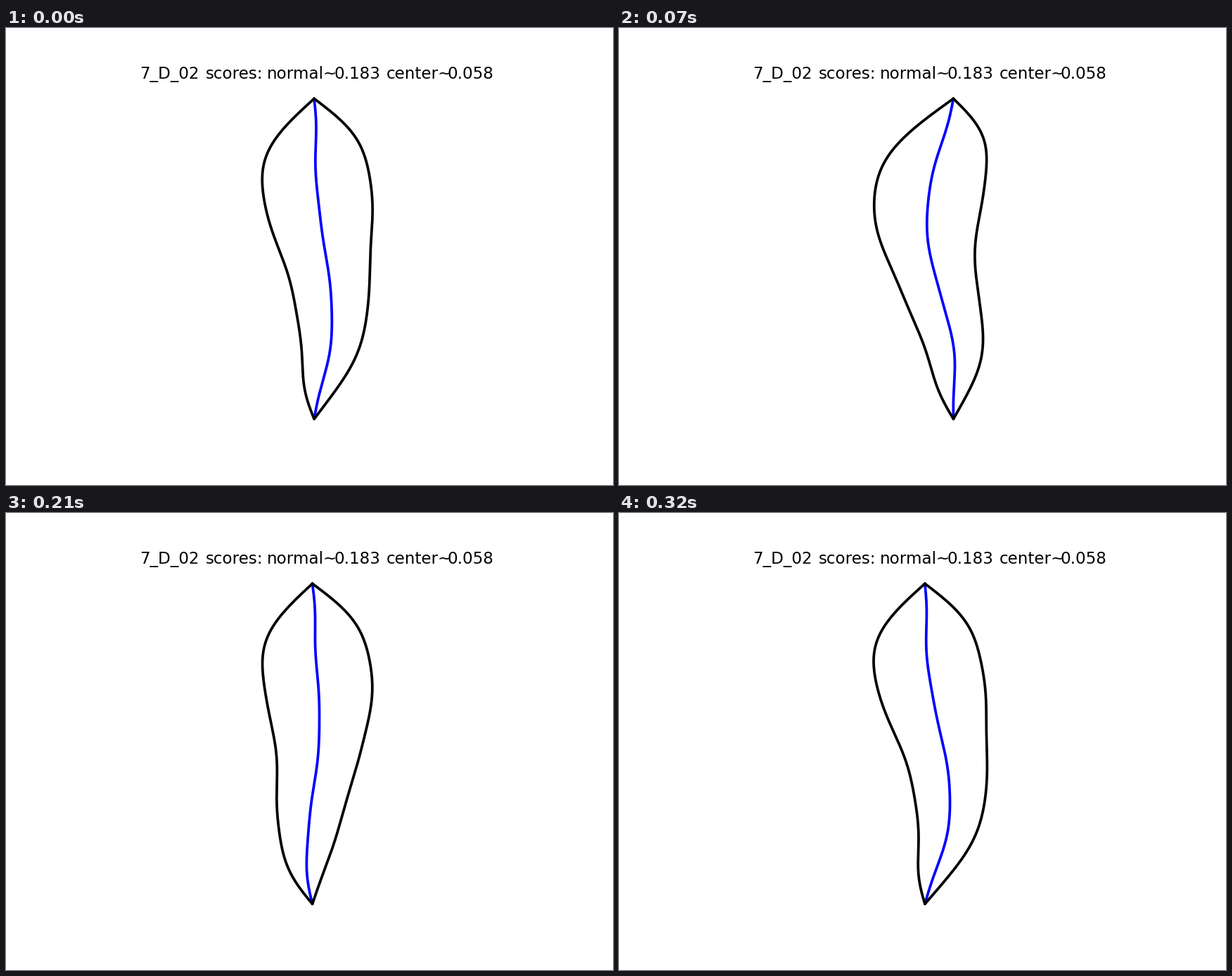
A matplotlib script for the animation above (350 ms loop, 863 by 649 pixels).

```python
import numpy as np
import matplotlib.pyplot as plt
from matplotlib.animation import FuncAnimation

W, H, DPI = 863, 649, 64
PT = 72 / DPI  # points per pixel
TOP, BOTTOM, CENTER = 100.3, 555.3, 442.7

# Strengths of the first bending waves of the midrib, one row per pose.
BENDS = [(18.3, -10, 0.9), (-27.5, -13.9, 4.3), (-55.8, 6.5, -0.2),
         (4.9, 6, -4.3), (26.1, -14.3, 0.6)]
PROFILE = (74.4, 17, 13.4, 2, 2, 0.6, 0.7)  # half width of the leaf

WORDS = [("7_D_02", 190.5), ("scores:", 284), ("normal~", 370.8),
         ("0.183", 466.8), ("center~", 540.3), ("0.058", 627.3)]

s = np.linspace(0, 1, 240)
ys = TOP + (BOTTOM - TOP) * s


def waves(strengths):
    """Sum of sines that vanish at both tips."""
    return sum(a * np.sin(k * np.pi * s)
               for k, a in enumerate(strengths, start=1))


half = waves(PROFILE)
hook = sum(5 / k * np.sin(k * np.pi * s) for k in (4, 6, 8))


def leaf(bends):
    """Midrib and both edges, centred by their outer extent."""
    mid = waves(bends) + hook
    left, right = mid - half, mid + half
    shift = CENTER - (left.min() + right.max()) / 2
    return mid + shift, left + shift, right + shift


fig = plt.figure(figsize=(W / DPI, H / DPI), dpi=DPI, facecolor="white")
ax = fig.add_axes([0, 0, 1, 1])
ax.set_xlim(0, W)
ax.set_ylim(H, 0)
ax.axis("off")

for word, x in WORDS:
    ax.text(x, 72, word, family="DejaVu Sans", size=23 * PT,
            color="black", va="baseline")

style = dict(lw=3.75 * PT, solid_capstyle="round", solid_joinstyle="round")
midrib, = ax.plot([], [], color="blue", **style)
outline, = ax.plot([], [], color="black", **style)


def draw(i):
    mid, left, right = leaf(BENDS[i % len(BENDS)])
    midrib.set_data(mid, ys)
    outline.set_data(np.r_[left, right[::-1]], np.r_[ys, ys[::-1]])
    return midrib, outline


anim = FuncAnimation(fig, draw, frames=len(BENDS), interval=70,
                     repeat=True, repeat_delay=0, blit=False)
plt.show()
```
